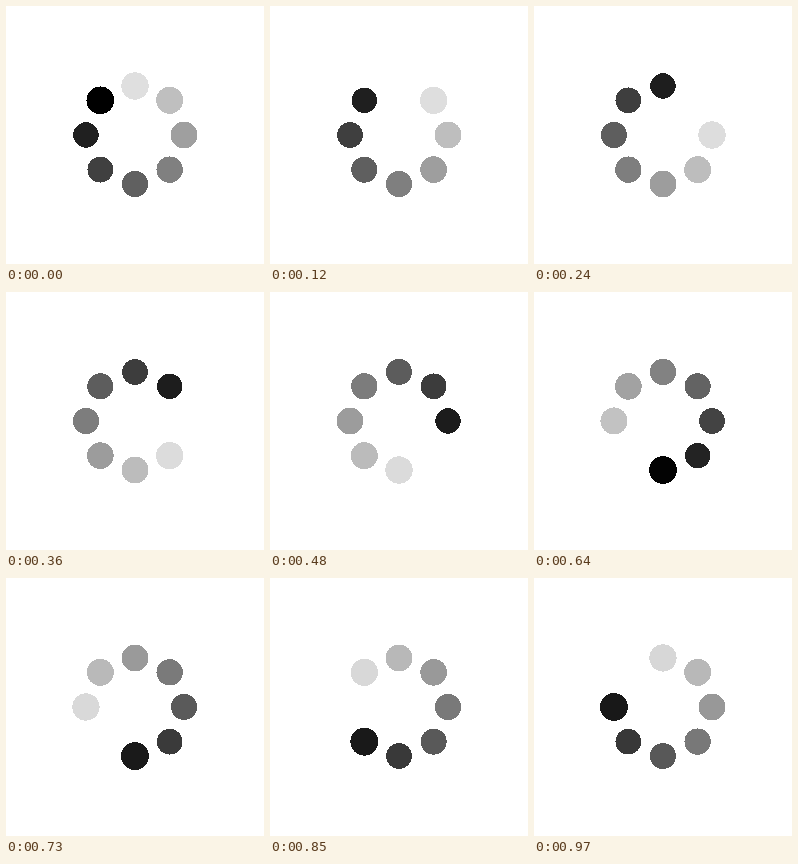
These frames come from a looping animation (258 by 258 pixels, 1 s). An HTML page:

```html
<!DOCTYPE html>
<html lang="en">
<head>
<meta charset="utf-8">
<title>Loading spinner</title>
<style>
  html, body { margin: 0; height: 100%; overflow: hidden; background: #fff; }
  svg { display: block; width: 100vw; height: 100vh; }
</style>
</head>
<body>
<svg viewBox="0 0 258 258" shape-rendering="crispEdges"></svg>
<script>
const COUNT = 8, STEPS = 33, LOOP = 1000, CENTER = 129, RING = 49.02;
const RADIUS = 12.7, GROWTH = 0.1, GROWTH_DELAY = 0.104;
const svg = document.querySelector('svg');

// Dots run clockwise from the top.
const dots = Array.from({ length: COUNT }, (_, i) => {
  const dot = document.createElementNS('http://www.w3.org/2000/svg', 'circle');
  const angle = i / COUNT * 2 * Math.PI;
  dot.setAttribute('cx', CENTER + RING * Math.sin(angle));
  dot.setAttribute('cy', CENTER - RING * Math.cos(angle));
  return svg.appendChild(dot);
});

function draw(now) {
  // The spinner ticks 33 times per loop, on 10 ms marks.
  const step = Math.floor((now % LOOP + 5) * STEPS / LOOP) % STEPS;
  dots.forEach((dot, i) => {
    const age = (step / STEPS + (COUNT - 1 - i) / COUNT) % 1;
    const gray = Math.round(255 * age);
    // Each dot grows steadily, then snaps back shortly after turning black.
    const growth = (age + 1 - GROWTH_DELAY) % 1;
    dot.setAttribute('fill', `rgb(${gray},${gray},${gray})`);
    dot.setAttribute('r', RADIUS * (1 + GROWTH * growth));
    // The faintest dot vanishes before it reaches white.
    dot.setAttribute('visibility', age > 0.8751 ? 'hidden' : 'visible');
  });
}

const start = performance.now();
function tick() {
  draw(performance.now() - start);
  requestAnimationFrame(tick);
}
tick();
</script>
</body>
</html>
```
